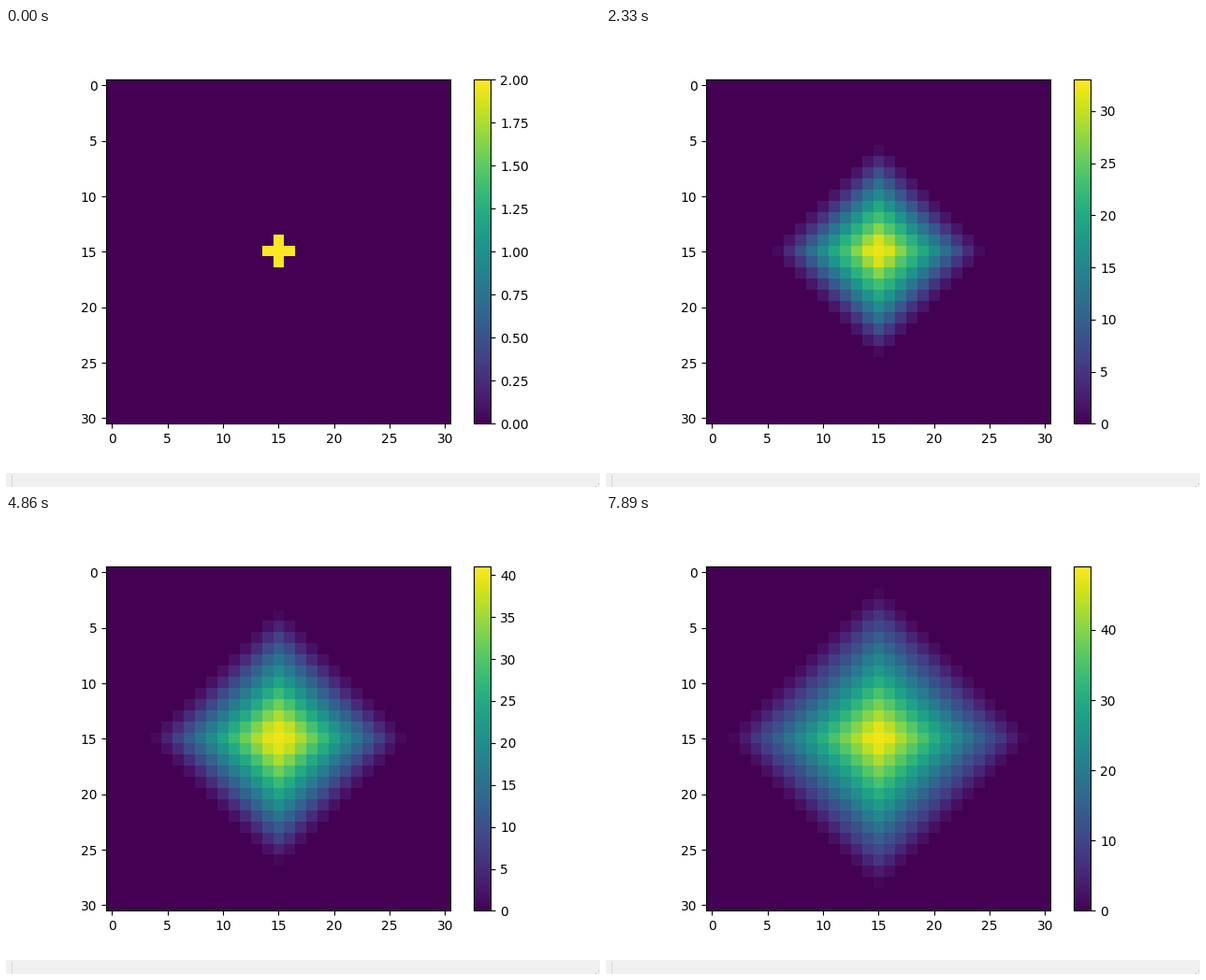
A matplotlib script for the animation above (8000 ms loop, 635 by 491 pixels).

```python
import numpy as np
import matplotlib.pyplot as plt
from matplotlib.animation import FuncAnimation
from matplotlib.patches import Rectangle

W, H, DPI = 635, 491, 100
STEP, LOOP = 20, 8000
N = 31
FULL_T, FULL_H, POWER = 7700, 49, 0.3  # the pile is 49 high at 7.7 s

x = np.abs(np.arange(N) - N // 2)
dist = x[:, None] + x[None, :]
off_axis = np.minimum(x[:, None], x[None, :]) > 0


def height_at(t):
    """Height in odd steps, and how far the next step has come."""
    raw = FULL_H * (t / FULL_T) ** POWER
    h = max(2, int((raw - 1) // 2 * 2 + 1))
    return h, np.clip((raw - h) / 2, 0, 1)


def pile(h, phase):
    """Diamond pile with slope 4 that refills from the rim inwards."""
    r, tip = (h - 1) // 4 + 1, (h - 1) % 4 + 1
    lag = round(0.03 * h)
    z = 4 * (r - dist) + tip + off_axis * (r > 1)
    z = np.minimum(z - lag * (dist < r), h - lag * (dist < r))
    z = z - lag * ((dist > 0) & (dist < r * (1 - phase)))
    return np.where(dist <= r, z, 0)


# the tiny surplus keeps the pixel size from rounding down
fig = plt.figure(figsize=((W + .001) / DPI, (H + .001) / DPI), dpi=DPI,
                 facecolor="white")


def pixel_axes(left, top, w, h):
    return fig.add_axes([left / W, 1 - (top + h) / H, w / W, h / H])


def pixel_rect(left, top, w, h, color):
    fig.add_artist(Rectangle((left / W, 1 - (top + h) / H), w / W, h / H,
                             transform=fig.transFigure, lw=0, fc=color))


SIDE = 368.06
ax = pixel_axes(107.25, 55.36, SIDE, SIDE)
cax = pixel_axes(500.03, 55.36, SIDE / 20, SIDE)
im = ax.imshow(pile(2, 0), cmap="viridis", vmin=0, vmax=2,
               interpolation="nearest", aspect="auto")
ax.set_xticks(range(0, N, 5))
ax.set_yticks(range(0, N, 5))
fig.colorbar(im, cax=cax)

# status strip under the plot
pixel_rect(0, 476, W, 15, "#f0f0f0")
pixel_rect(6, 478, 1, 13, "#d7d7d7")
pixel_rect(633, 487, 1, 1, "#b0b0b0")
pixel_rect(630, 490, 1, 1, "#b0b0b0")


def update(i):
    h, phase = height_at(i * STEP)
    im.set_data(pile(h, phase))
    if im.get_clim()[1] != h:
        im.set_clim(0, h)
    return [im]


anim = FuncAnimation(fig, update, frames=LOOP // STEP, interval=STEP,
                     repeat=True, repeat_delay=0, blit=False)
plt.show()
```
